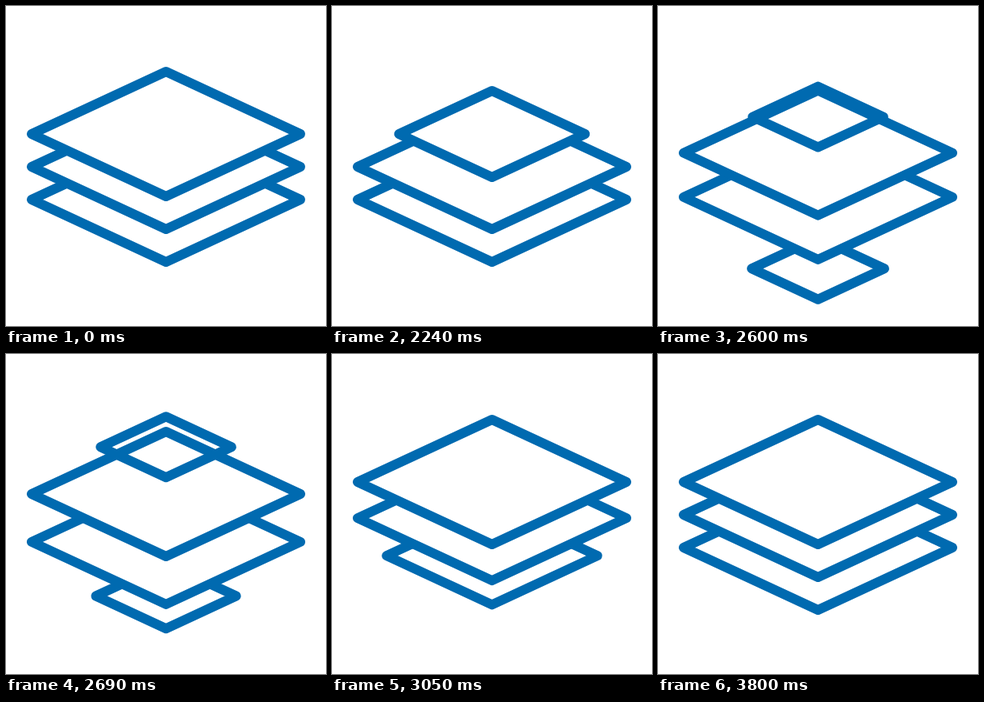
Recreate the animation shown at these times as an HTML page. Size 400 by 400 pixels, loop 3.83 s.

```html
<!DOCTYPE html>
<html lang="en">
<head>
<meta charset="utf-8">
<title>Layers</title>
<style>
  html, body { margin: 0; width: 100%; height: 100%; overflow: hidden; background: #fff; }
  svg { display: block; width: 100vw; height: 100vh; }
  path { fill: #fff; stroke: #006ab0; stroke-width: 12; stroke-linejoin: round; }
</style>
</head>
<body>
<svg viewBox="0 0 400 400">
  <path id="incoming"/>
  <path id="lower"/>
  <path id="middle"/>
  <path id="outgoing"/>
</svg>
<script>
const LOOP = 3830, REST = 2030, STEP = 30;
const HALF_W = 168, HALF_H = 78, SMALL = 0.487;
const TOP = 160, GAP = 41;      // resting height of the top layer, distance between layers
const SWAP = 2570, GONE = 2840; // new layer appears, old layer vanishes
const [incoming, lower, middle, outgoing] =
  ['incoming', 'lower', 'middle', 'outgoing'].map(id => document.getElementById(id));

const mix = (from, to, p) => from + (to - from) * p;
const progress = (t, start, end) => Math.min(1, Math.max(0, (t - start) / (end - start)));

// Cubic Bézier easing with handles (x1, 0) and (x2, 1).
function ease(p, x1 = 1 / 3, x2 = 0.5) {
  let lo = 0, hi = 1;
  for (let i = 0; i < 24; i++) {
    const s = (lo + hi) / 2, w = 1 - s;
    if (3 * x1 * s * w * w + 3 * x2 * s * s * w + s ** 3 < p) lo = s; else hi = s;
  }
  return hi * hi * (3 - 2 * hi);
}
const easeIn = p => p ** 2.6;
const easeOut = p => 1 - (1 - p) ** 4.5;

function place(path, y, scale = 1) {
  const w = HALF_W * scale, h = HALF_H * scale;
  path.setAttribute('d', `M200 ${y - h}L${200 + w} ${y}L200 ${y + h}L${200 - w} ${y}Z`);
}

function draw(time) {
  const t = time < REST ? 0 : REST + Math.floor((time - REST) / STEP) * STEP;
  const bottom = TOP + 2 * GAP;

  place(outgoing,
    mix(TOP, TOP - 90, easeIn(progress(t, 2315, 2810))),
    mix(1, SMALL, ease(progress(t, 2000, 2580), 1 / 3, 0.3)));
  place(middle, mix(TOP + GAP, TOP, ease(progress(t, 2317, 3037))));
  place(lower, mix(bottom, TOP + GAP, ease(progress(t, 2381, 3255), 0.6)));
  place(incoming,
    mix(bottom + 93, bottom, easeOut(progress(t, 2580, 3790))),
    mix(SMALL, 1, ease(progress(t, 2531, 3601))));

  outgoing.style.fill = t < SWAP ? '#fff' : 'none';
  outgoing.style.display = t < GONE ? '' : 'none';
  incoming.style.display = t < SWAP ? 'none' : '';
}

const start = performance.now();
function tick() {
  draw((performance.now() - start) % LOOP);
  requestAnimationFrame(tick);
}
tick();
</script>
</body>
</html>
```
